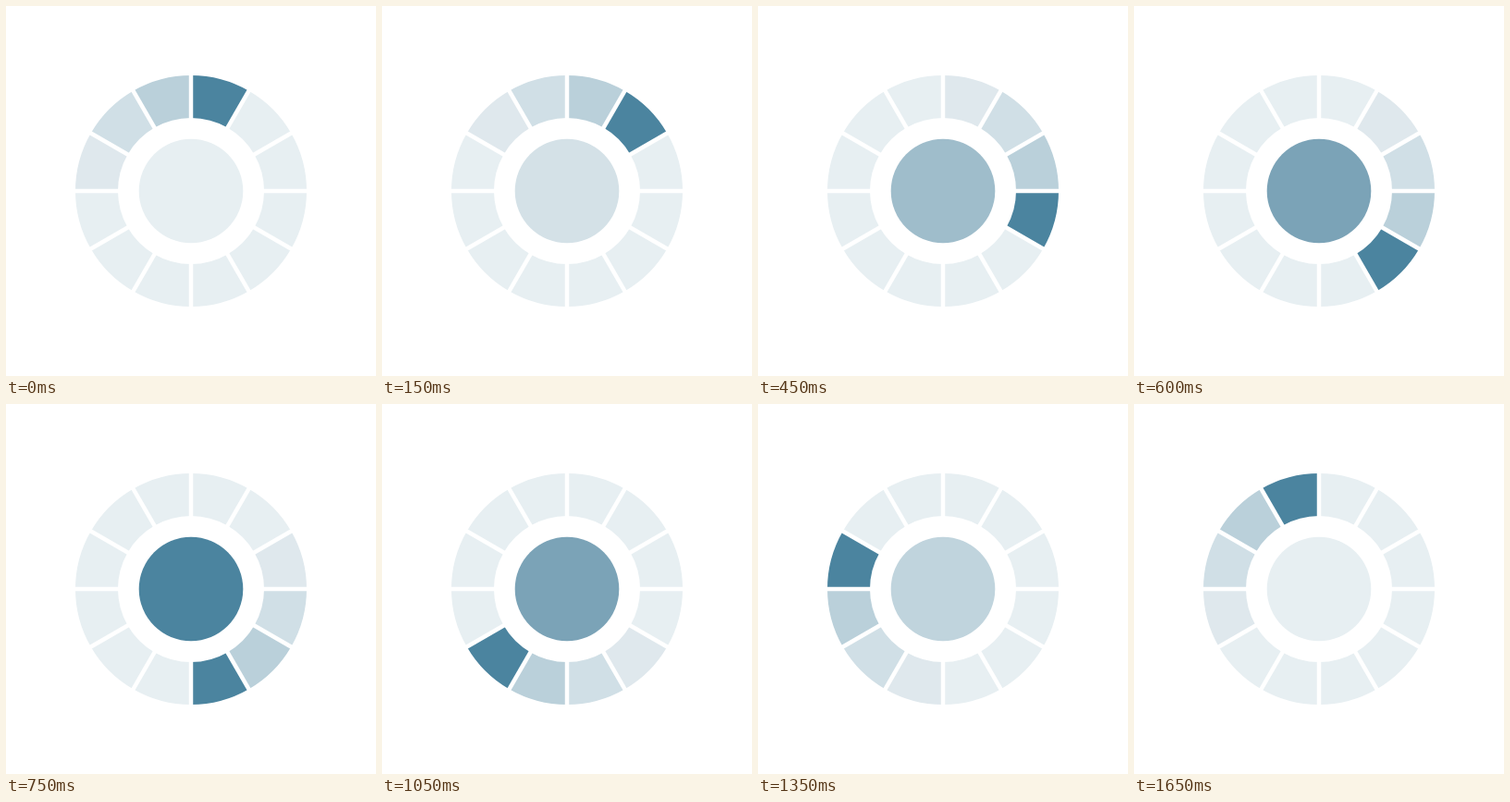
An HTML page for the animation above (1.8 s loop, 400 by 400 pixels).

```html
<!DOCTYPE html>
<html lang="en">
<head>
<meta charset="utf-8">
<title>Segmented loader</title>
<style>
  html, body { margin: 0; width: 100%; height: 100%; overflow: hidden; background: #fff; }
  svg { display: block; width: 100%; height: 100%; }
</style>
</head>
<body>
<svg viewBox="-200 -200 400 400">
  <g id="ring" fill="none" stroke-width="46"></g>
  <g id="gaps" stroke="#fff" stroke-width="4.5"></g>
  <circle id="hub" r="56.3"/>
</svg>
<script>
const COUNT = 12, STEP = 150;
const LIGHT = '#e7eff2', DARK = '#4b849f';
const TAIL = [DARK, '#bad0da', '#d0dfe6', '#dfe8ed'];
const PULSE = [LIGHT, '#d4e1e7', '#c0d4dd', '#9fbdcb', '#7ba3b7', DARK];

const ring = document.getElementById('ring');
const gaps = document.getElementById('gaps');
const hub = document.getElementById('hub');

function add(parent, tag, attrs) {
  const el = document.createElementNS('http://www.w3.org/2000/svg', tag);
  for (const key in attrs) el.setAttribute(key, attrs[key]);
  return parent.appendChild(el);
}

const segments = Array.from({ length: COUNT }, (_, i) => {
  const transform = `rotate(${i * 360 / COUNT})`;
  add(gaps, 'line', { y1: -70, y2: -130, transform });
  // 30 degree arc of radius 102, clockwise from the top
  return add(ring, 'path', { d: 'M0-102A102 102 0 0 1 51-88.335', transform });
});

function draw(now) {
  const head = Math.floor(now / STEP) % COUNT;
  segments.forEach((segment, i) => {
    segment.setAttribute('stroke', TAIL[(head - i + COUNT) % COUNT] || LIGHT);
  });
  hub.setAttribute('fill', PULSE[Math.min(head, COUNT - 1 - head)]);
}

const start = performance.now();
function tick() {
  draw(performance.now() - start);
  requestAnimationFrame(tick);
}
tick();
</script>
</body>
</html>
```
